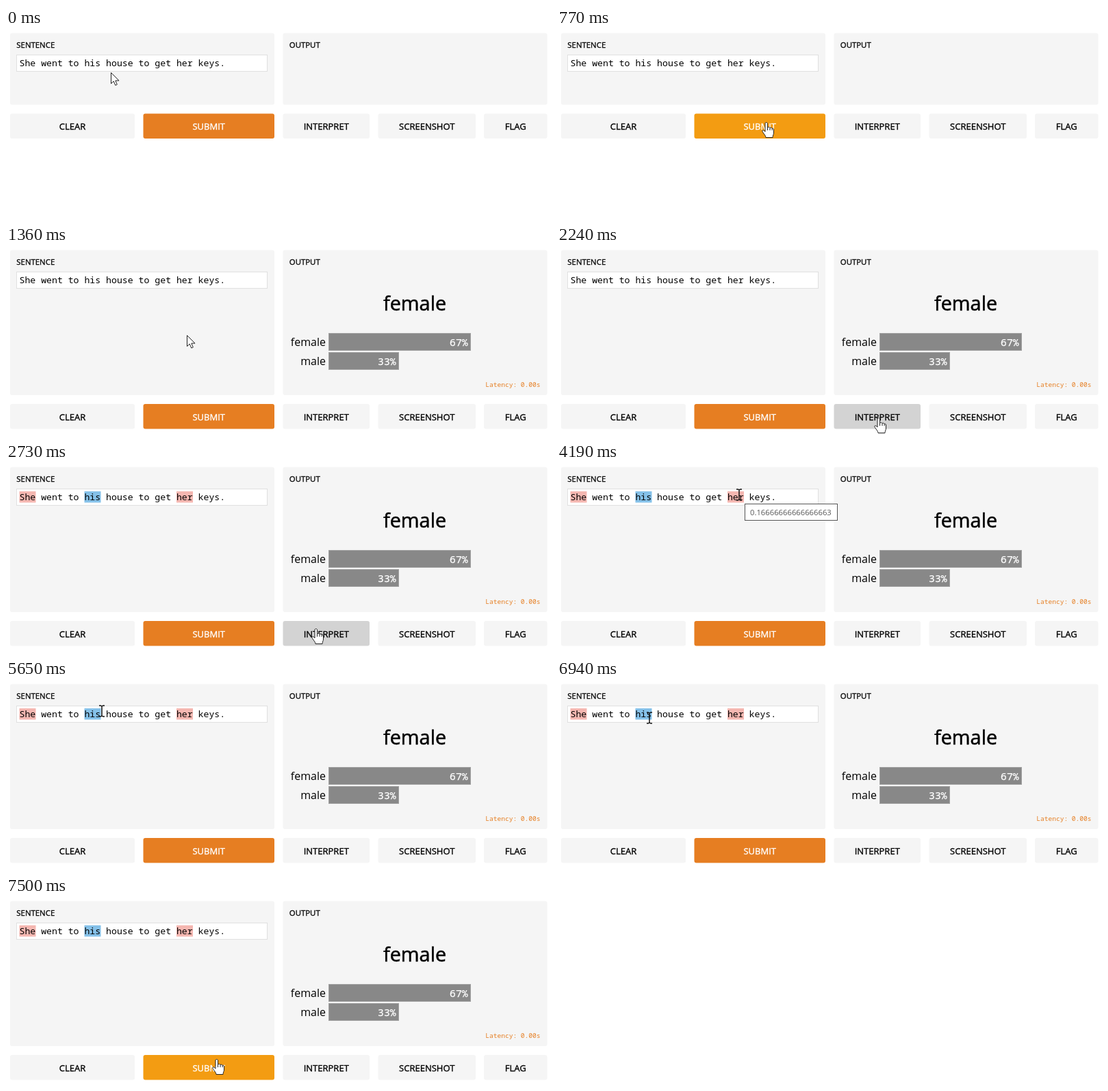
An HTML page for the animation above (7600 ms loop, 796 px wide and 277 px high).

```html
<!DOCTYPE html>
<html lang="en">
<head>
<meta charset="utf-8">
<title>Sentence classifier demo</title>
<style>
  html, body { margin: 0; width: 100%; height: 100%; overflow: hidden; background: #fff; }
  svg { display: block; width: 796px; height: 277px; }
  text { font-family: "Open Sans", sans-serif; white-space: pre; }
  .mono { font-family: "Noto Sans Mono", monospace; }
  .panel, .btn rect { fill: #f5f5f5; }
  .label { font-size: 11.4px; stroke: #000; stroke-width: .3px; }
  .btn text { font-size: 13px; text-anchor: middle; stroke: #000; stroke-width: .35px; }
  .btn.primary rect { fill: #e67e22; }
  .btn.primary text { fill: #fff; stroke: #fff; }
  .btn.hover rect { fill: #d3d3d3; }
  .btn.primary.hover rect { fill: #f39c12; }
  .end { text-anchor: end; }
  #cursor path { fill: #fff; stroke: #222; stroke-width: 1px; stroke-linejoin: round; }
  #cursor .line { fill: none; }
  #cursor .beam { fill: none; stroke: #111; stroke-width: 1.5px; }
</style>
</head>
<body>
<svg viewBox="0 0 796 277">
  <rect class="panel" x="6" y="7.5" width="386" rx="3"/>
  <rect class="panel" x="404.5" y="7.5" width="386" rx="3"/>
  <text class="label" x="15.3" y="29">SENTENCE</text>
  <text class="label" x="413.8" y="29">OUTPUT</text>
  <rect x="15.5" y="39.5" width="366" height="24" fill="#fff" stroke="#e0e0e0"/>
  <g id="marks">
    <rect x="19.5" y="43" width="24" height="16.5" fill="#f5b7b1"/>
    <rect x="114.5" y="43" width="24" height="16.5" fill="#85c1e9"/>
    <rect x="249" y="43" width="24" height="16.5" fill="#f5b7b1"/>
  </g>
  <text class="mono" x="19.5" y="56" font-size="13.2">She went to his house to get her keys.</text>

  <g id="result">
    <text x="597" y="96" font-size="28.8" text-anchor="middle" stroke="#000" stroke-width=".5">female</text>
    <g fill="#888" stroke="#a2a2a2">
      <rect x="471.5" y="129.5" width="207" height="25"/>
      <rect x="471.5" y="157.5" width="102" height="25"/>
    </g>
    <g class="end" font-size="16">
      <text x="467" y="148">female</text>
      <text x="467" y="176">male</text>
    </g>
    <g class="end" font-size="14.67" fill="#fff" stroke="#fff" stroke-width=".25">
      <text class="mono" x="674.5" y="147.5">67%</text>
      <text class="mono" x="569.5" y="175.5">33%</text>
    </g>
    <text class="mono end" x="780.5" y="208" font-size="9.55" fill="#e67e22">Latency: 0.00s</text>
  </g>

  <g id="buttons"></g>

  <g id="tip">
    <rect x=".5" y=".5" height="24" fill="#fff" stroke="#555"/>
    <text x="8" y="17" font-size="11.25" fill="#575757"></text>
  </g>

  <g id="cursor">
    <g id="arrow"><path d="M.5 .5V16.5L4.2 13 6.8 19 9.3 17.9 6.8 12.1H12Z"/></g>
    <g id="hand">
      <path d="M-2 2C-2 0 1.5 0 1.5 2V8C2.5 7 4.5 7 5 8.5 6 7.6 7.8 8 8.2 9.3 9.2 8.7 10.5 9.3 10.5 11V16C10.5 18 9 19.5 9 22.5H-1C-1 20 -3 18.5 -5.5 14.6 -7 12.3 -5.3 11 -3.8 12.2L-2 14Z"/>
      <path class="line" d="M1.5 8V12M5 8.5V12M8.2 9.3V12"/>
    </g>
    <g id="beam"><path class="beam" d="M-4 -8H-1.5L0 -7 1.5 -8H4M0 -7V7M-4 8H-1.5L0 7 1.5 8H4"/></g>
  </g>
</svg>
<script>
const LOOP = 7600, RESULT_AT = 970, MARKS_AT = 2440;
const $ = s => document.querySelector(s);
const show = (el, on) => el.setAttribute('display', on ? 'inline' : 'none');
const within = (v, a, b) => v >= a && v < b;

const easeIn = u => u * u * u;
const easeOut = u => 1 - (1 - u) ** 2;
const smooth = u => u * u * (3 - 2 * u);

// Pointer moves: first step, last step, step count, easing, Bezier points
const moves = [
  [100, 770, 8, smooth, [[153, 65], [146, 30], [190, 150], [306, 138]]],
  [970, 1360, 5, smooth, [[306, 138], [280, 140], [264, 132]]],
  [1550, 2050, 6, smooth, [[264, 132], [350, 190], [470, 253]]],
  [2240, 2930, 8, easeIn, [[470, 253], [400, 217]]],
  [3020, 3690, 8, easeOut, [[400, 217], [282, 155], [266, 48]]],
  [4880, 5560, 8, smooth, [[266, 48], [245, 105], [170, 85], [146, 47]]],
  [5650, 6040, 5, easeOut, [[146, 47], [128, 46]]],
  [6940, 7500, 7, smooth, [[128, 46], [190, 150], [308, 239]]]
];

const tips = [
  { from: 4190, to: 4880, x: 274, y: 61, w: 136, text: '0.16666666666666663' },
  { from: 6640, to: 6940, x: 138, y: 59, w: 140, text: '-0.33333333333333337' }
];

const buttons = [
  ['CLEAR', 6, 188], ['SUBMIT', 200.5, 392], ['INTERPRET', 404.5, 531],
  ['SCREENSHOT', 543.5, 686], ['FLAG', 698, 790.5]
].map(([name, left, right]) => {
  const el = document.createElementNS('http://www.w3.org/2000/svg', 'g');
  el.innerHTML = `<rect x="${left}" width="${right - left}" height="36.5" rx="3"/>` +
    `<text x="${(left + right) / 2}" y="23.5">${name}</text>`;
  $('#buttons').append(el);
  return { el, left, right, base: name === 'SUBMIT' ? 'btn primary' : 'btn' };
});

const panels = document.querySelectorAll('.panel');
const [marks, result, tipBox, cursor] = ['#marks', '#result', '#tip', '#cursor'].map($);
const shapes = ['arrow', 'hand', 'beam'].map(id => [id, $('#' + id)]);

function bezier(pts, u) {
  while (pts.length > 1)
    pts = pts.slice(1).map((p, i) => p.map((v, k) => pts[i][k] + (v - pts[i][k]) * u));
  return pts[0];
}

function pointer(t) {
  const move = moves.filter(m => t >= m[0]).pop();
  if (!move) return moves[0][4][0];
  const [start, end, n, ease, pts] = move;
  const step = Math.floor((t - start) / (end - start) * (n - 1) + 1e-6);
  return bezier(pts, ease(Math.min(1, (step + 1) / n))).map(Math.round);
}

function render(t) {
  const open = t >= RESULT_AT, marked = t >= MARKS_AT;
  const top = open ? 233 : 125.5;
  const [x, y] = pointer(t);

  panels.forEach(p => p.setAttribute('height', open ? 212.5 : 105));
  show(result, open);
  show(marks, marked);

  const overText = marked
    ? within(x, 19, 321) && within(y, 42, 61)
    : within(x, 15, 382) && within(y, 39, 64);
  let kind = overText ? 'beam' : 'arrow';

  for (const b of buttons) {
    const over = within(x, b.left, b.right) && within(y, top, top + 36.5);
    if (over) kind = 'hand';
    b.el.setAttribute('transform', `translate(0 ${top})`);
    b.el.setAttribute('class', b.base + (over ? ' hover' : ''));
  }

  const tip = tips.find(p => within(t, p.from, p.to));
  show(tipBox, tip);
  if (tip) {
    tipBox.setAttribute('transform', `translate(${tip.x} ${tip.y})`);
    tipBox.children[0].setAttribute('width', tip.w - 1);
    tipBox.children[1].textContent = tip.text;
  }

  cursor.setAttribute('transform', `translate(${x} ${y})`);
  shapes.forEach(([id, el]) => show(el, id === kind));
}

const began = performance.now();
function tick() {
  render((performance.now() - began) % LOOP);
  requestAnimationFrame(tick);
}
tick();
</script>
</body>
</html>
```
